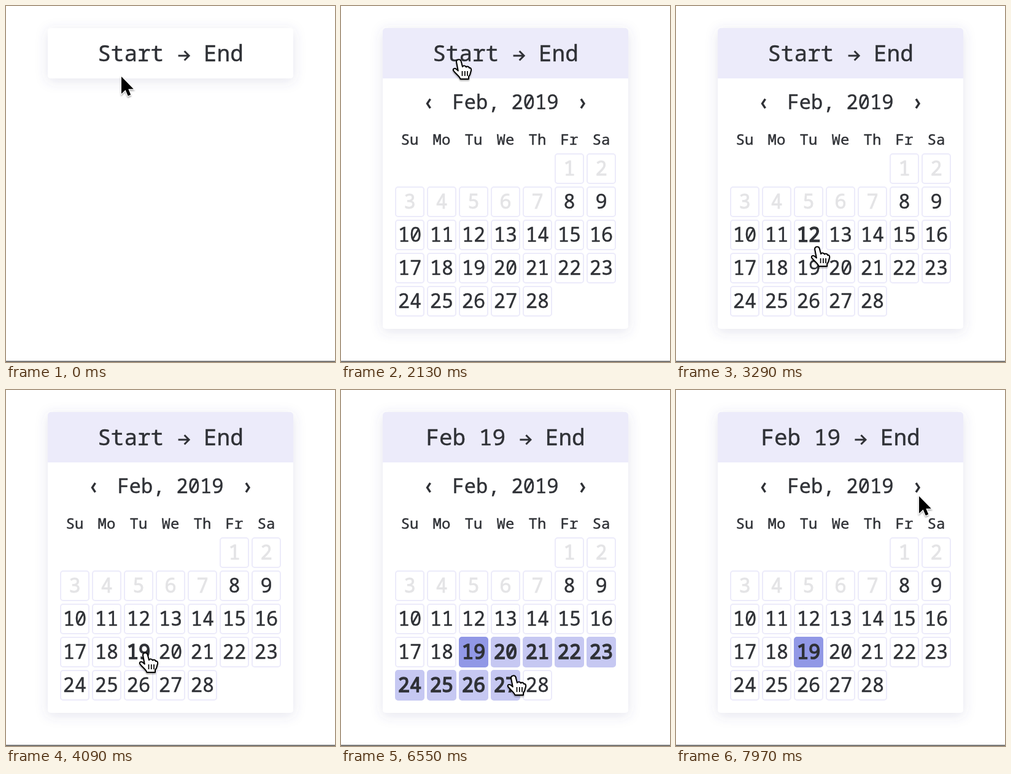
Animation, 536 px wide and 580 px high, one loop 8000 ms. Source, as an HTML page:

```html
<!DOCTYPE html>
<html lang="en">
<head>
<meta charset="utf-8">
<title>Date range picker</title>
<style>
  html, body { margin: 0; width: 100%; height: 100%; overflow: hidden; background: #fff; }
  svg { display: block; width: 536px; height: 580px; }
  text {
    font-family: "Noto Sans Mono", "DejaVu Sans Mono", monospace;
    fill: #2f3136; stroke: #2f3136; stroke-width: .45; text-anchor: middle;
  }
  .disabled { fill: #e4e4e6; stroke: #e4e4e6; stroke-width: .9; }
  .strong { stroke-width: 1.6; }
  .line { fill: none; stroke: #2f3136; }
</style>
</head>
<body>
<svg viewBox="0 0 536 580">
  <defs>
    <filter id="shadow" x="-20%" y="-50%" width="140%" height="220%">
      <feDropShadow dx="0" dy="4" stdDeviation="10" flood-color="#50508c" flood-opacity=".15"/>
    </filter>
    <filter id="cursorShadow" x="-50%" y="-50%" width="200%" height="200%">
      <feDropShadow dx="0" dy="2" stdDeviation="1.3" flood-color="#000" flood-opacity=".35"/>
    </filter>
  </defs>
  <rect width="536" height="580" fill="#fff"/>
  <rect id="card" x="68" y="36" width="400" rx="5" fill="#fff" filter="url(#shadow)"/>
  <path id="head" d="M68 118V41a5 5 0 0 1 5-5H463a5 5 0 0 1 5 5V118Z" fill="#ecebfa"/>
  <text id="title" x="268" y="89.8" font-size="36"></text>
  <path id="arrow" class="line" d="M-9 0H8M1-7.5L8.5 0L1 7.5" stroke-width="3"/>
  <g id="calendar">
    <text x="268" y="168" font-size="32">Feb, 2019</text>
    <path class="line" d="M145.5 151.5L140.5 159L145.5 166.5M391 151.5L396 159L391 166.5" stroke-width="3.4"/>
  </g>
  <rect y="578" width="536" height="2" fill="#787878"/>
  <g id="cursor" filter="url(#cursorShadow)">
    <path id="pointer" d="M0 0V28L6.6 21.8L10.8 31.5L15.2 29.6L11.3 20.2H19.8Z" stroke="#fff" stroke-width="2" paint-order="stroke"/>
    <g id="hand" transform="translate(-1 -1)">
      <path d="M-4 4C-4-.5 2.5-1 3.6 3L6 12C7.5 9.5 11 10 11.8 12.5C13.5 10.8 16.5 11.5 17 14C19 13 20.5 15 20 18L18 25L16 28V32H2.5C1 27-5 24-9 18C-10 14.5-6.5 14-4 16L-1.2 18.5Z" fill="#fff" stroke="#000" stroke-width="2" stroke-linejoin="round"/>
      <path d="M5.5 19V27M9.8 19V27M14 19V27" stroke="#000" stroke-width="1.7"/>
    </g>
  </g>
</svg>
<script>
const LOOP = 8000, OPEN = 2130, PICK = 5050;
const START_DAY = 19, FIRST_DAY = 8, LAST_DAY = 28, OFFSET = 5;
const COL = 52, ROW = 54, LEFT = 88, TOP = 240, CELL_W = 48, CELL_H = 50;
const $ = id => document.getElementById(id);

// Key points of the pointer; a repeated position is a rest.
const stops = [
  { t: 40, x: 188, y: 115 }, { t: 210, x: 193, y: 88 }, { t: 2550, x: 193, y: 88 },
  { t: 2860, x: 401, y: 310 }, { t: 3080, x: 245, y: 458 }, { t: 3180, x: 183, y: 425 },
  { t: 3290, x: 231, y: 393 }, { t: 3710, x: 228, y: 429 }, { t: 6010, x: 228, y: 429 },
  { t: 6300, x: 292, y: 436 }, { t: 6550, x: 282, y: 466 }, { t: 6880, x: 300, y: 481 },
  { t: 7380, x: 345, y: 404 }, { t: 7550, x: 367, y: 329 }, { t: 7970, x: 396, y: 173 }
];

function add(tag, attrs, label = "") {
  const node = document.createElementNS("http://www.w3.org/2000/svg", tag);
  for (const key in attrs) node.setAttribute(key, attrs[key]);
  node.textContent = label;
  return $("calendar").appendChild(node);
}

const show = (id, visible) => { $(id).style.display = visible ? "" : "none"; };

"Su Mo Tu We Th Fr Sa".split(" ").forEach((name, i) =>
  add("text", { x: LEFT + CELL_W / 2 + i * COL, y: 226, "font-size": 24 }, name));

const days = Array.from({ length: LAST_DAY }, (_, i) => {
  const slot = i + OFFSET, x = LEFT + slot % 7 * COL, y = TOP + Math.floor(slot / 7) * ROW;
  return {
    day: i + 1,
    box: add("rect", { x: x + 1, y: y + 1, width: CELL_W - 2, height: CELL_H - 2, rx: 4, "stroke-width": 2 }),
    label: add("text", { x: x + CELL_W / 2, y: y + 35.5, "font-size": 32 }, i + 1)
  };
});

function slope(i, axis) {
  const a = stops[i - 1], b = stops[i], c = stops[i + 1];
  const still = (p, q) => p.x === q.x && p.y === q.y;
  if (!a || !c || still(a, b) || still(b, c)) return 0;
  return (c[axis] - a[axis]) / (c.t - a.t);
}

// Smooth curve through the stops
function pointerAt(t) {
  const next = stops.findIndex(s => s.t > t);
  const i = next < 0 ? stops.length - 2 : Math.max(0, next - 1);
  const a = stops[i], b = stops[i + 1], span = b.t - a.t;
  const u = Math.min(1, Math.max(0, (t - a.t) / span)), v = 1 - u;
  return ["x", "y"].map(k => a[k] + (b[k] - a[k]) * u * u * (3 - 2 * u)
    + span * u * v * (v * slope(i, k) - u * slope(i + 1, k)));
}

// The nearest day keeps the range in the gaps; "inside" holds only on the cell itself.
function hitDay(x, y) {
  const col = Math.floor((x - LEFT + 2) / COL), row = Math.floor((y - TOP + 2) / ROW);
  const day = row * 7 + col - OFFSET + 1;
  if (col < 0 || col > 6 || day < 1 || day > LAST_DAY) return { day: 0, inside: false };
  const dx = x - LEFT - col * COL, dy = y - TOP - row * ROW;
  return { day, inside: dx >= 0 && dx <= CELL_W && dy >= 0 && dy <= CELL_H };
}

function paintDay({ day, box, label }, hover, picked) {
  const chosen = picked && day === START_DAY;
  const ranged = picked && day > START_DAY && day <= hover.day;
  const hovered = hover.inside && hover.day === day;
  const fill = chosen ? "#9198e6" : ranged ? "#c6c8f2" : "#fff";
  box.setAttribute("fill", fill);
  box.setAttribute("stroke", chosen || ranged ? fill : "#ecebfa");
  label.setAttribute("class",
    day < FIRST_DAY ? "disabled" : chosen || ranged || hovered ? "strong" : "");
}

function render(t) {
  const open = t >= OPEN, picked = t >= PICK;
  const [x, y] = pointerAt(t);
  const hover = open ? hitDay(x, y) : { day: 0, inside: false };

  $("card").setAttribute("height", open ? 490 : 82);
  show("head", open);
  show("calendar", open);
  // The blank in the title leaves room for the drawn arrow.
  $("title").textContent = (picked ? "Feb 19" : "Start") + "\u00a0\u00a0\u00a0End";
  $("arrow").setAttribute("transform", `translate(${picked ? 300.4 : 289.6} 81)`);
  days.forEach(d => paintDay(d, hover, picked));

  const clickable = y < 112 || hover.inside && hover.day >= FIRST_DAY;
  show("hand", clickable);
  show("pointer", !clickable);
  $("cursor").setAttribute("transform", `translate(${x} ${y})`);
}

const began = performance.now();
function tick() {
  render((performance.now() - began) % LOOP);
  requestAnimationFrame(tick);
}
tick();
</script>
</body>
</html>
```
